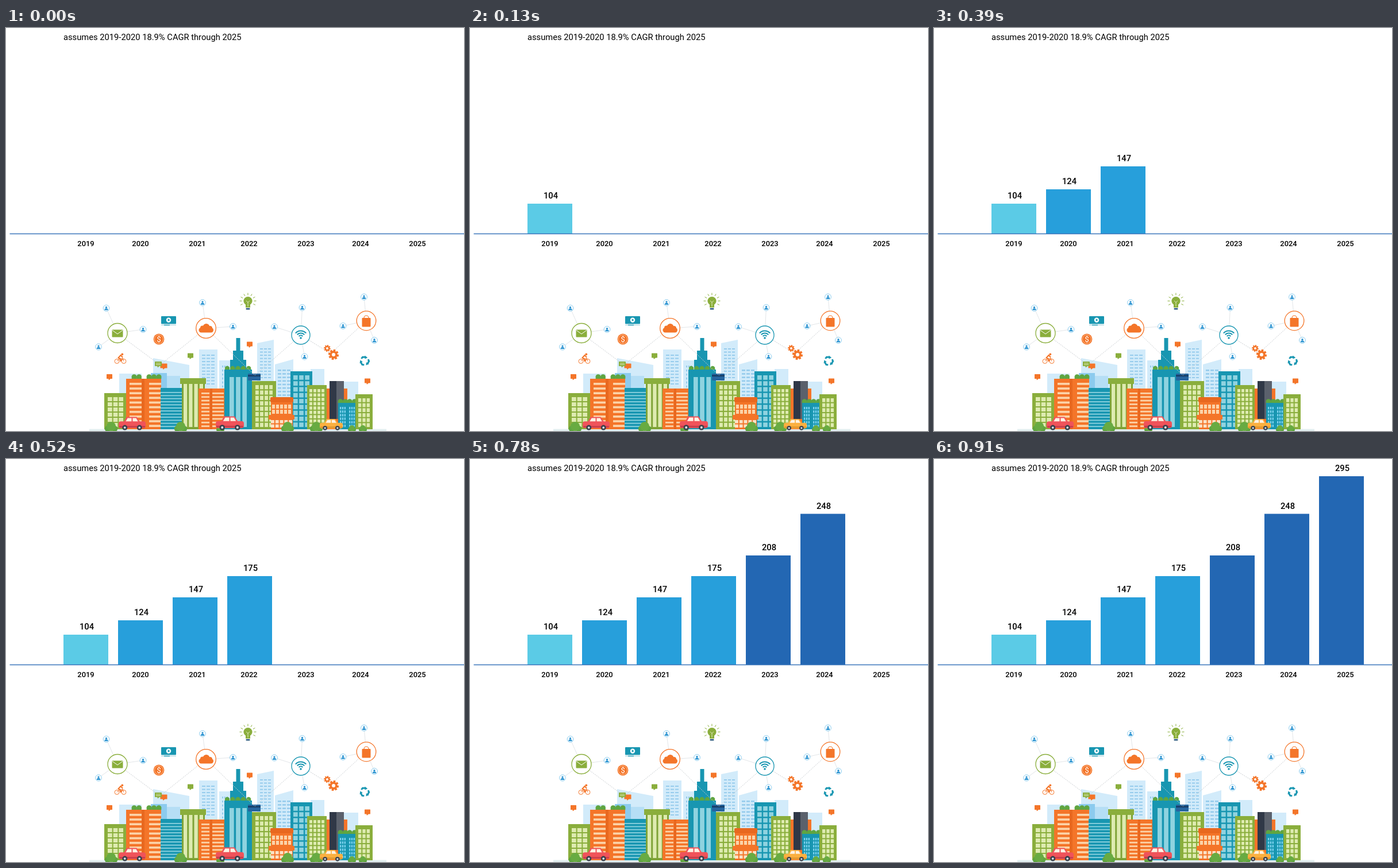
Animation of 797x702 px, one loop 1040 ms. Source, as an HTML page with a canvas:

```html
<!DOCTYPE html>
<html lang="en">
<head>
<meta charset="utf-8">
<title>Growth chart</title>
<style>
html, body { margin: 0; width: 100%; height: 100%; overflow: hidden; background: #fff; }
canvas { display: block; }
</style>
</head>
<body>
<canvas id="stage" width="797" height="702"></canvas>
<script>
const g = document.getElementById('stage').getContext('2d');
const GREEN = '#8aae3c', LEAF = '#5fa541', LIME = '#deebb0', ORANGE = '#f47529', RUST = '#e8681f', PEACH = '#fcd3a8';
const TEAL = '#1896b1', AQUA = '#8fd3e0', SKY = '#d2ebfa', PANE = '#95cbec', BLUE = '#2b93d1';
const GROUND = 699;

// Drawing helpers
function rect(color, x, y, w, h, r = 0) {
  g.fillStyle = color;
  g.beginPath();
  g.roundRect(x, y, w, h, r);
  g.fill();
}
function path(...p) {
  g.beginPath();
  for (let i = 0; i < p.length; i += 2) g.lineTo(p[i], p[i + 1]);
}
function poly(color, ...p) {
  path(...p);
  g.fillStyle = color;
  g.fill();
}
function line(color, w, ...p) {
  path(...p);
  g.strokeStyle = color;
  g.lineWidth = w;
  g.stroke();
}
function disc(color, x, y, r, from = 0, to = 7) {
  g.fillStyle = color;
  g.beginPath();
  g.arc(x, y, r, from, to);
  g.fill();
}
function ring(color, x, y, r, w = 1, from = 0, to = 7) {
  g.strokeStyle = color;
  g.lineWidth = w;
  g.beginPath();
  g.arc(x, y, r, from, to);
  g.stroke();
}
function grid(color, x, y, w, h, cols, rows, gapX, gapY = gapX) {
  const dx = (w + gapX) / cols, dy = (h + gapY) / rows;
  for (let i = 0; i < cols * rows; i++)
    rect(color, x + i % cols * dx, y + Math.floor(i / cols) * dy, dx - gapX, dy - gapY);
}
function text(s, x, y, font, align = 'center', color = '#000') {
  g.font = font + 'px Roboto, sans-serif';
  g.textAlign = align;
  g.fillStyle = color;
  g.fillText(s, x, y);
}
function spokes(count, from, span, drawOne) {
  for (let i = 0; i < count; i++) {
    const a = from + i * span / count;
    drawOne(Math.cos(a), Math.sin(a), a);
  }
}

// City parts
function tower(wall, x, top, w, glass, cols, rows, gapX, gapY = gapX, inset = 5) {
  rect(wall, x, top, w, GROUND - top);
  grid(glass, x + inset, top + 7, w - 2 * inset, GROUND - 11 - top, cols, rows, gapX, gapY);
}
function farTower(x, top, w, rise, panes) {
  poly(SKY, x, top, x + w, top - rise, x + w, 650, x, 650);
  if (panes) grid(PANE, x + 5, top + 9, w - 10, 52, 3, panes, 2, 3.6);
}
function hedge(x, count, r, step) {
  for (let i = 0; i < count; i++) disc(LEAF, x + i * step, 594 + r, r);
}
function rooftop(x, y, count, r = 4.5, step = 8.5) {
  for (let i = 0; i < count; i++) {
    rect(LEAF, x + i * step - r, y - r * .4, 2 * r, r * .8, 2);
    disc(LEAF, x + i * step, y - r * .5, r);
  }
}
function bush(x, r = 8) {
  const y = GROUND + 3 - r;
  disc(LEAF, x - r * .75, y + r * .5, r * .65);
  disc(LEAF, x + r * .75, y + r * .5, r * .65);
  disc('#68ab42', x, y, r);
}
function car(x, w, color, dark) {
  g.save();
  g.translate(x, 701 - w / 2);
  g.scale(w / 48, w / 48);
  poly(color, 9, 9, 14, 0, 32, 0, 38, 9);
  poly('#fdf3e4', 12, 9, 16, 2, 23, 2, 23, 9);
  poly('#fdf3e4', 25, 9, 25, 2, 31, 2, 35, 9);
  rect(color, 0, 8, 48, 12, 4);
  rect(dark, 1, 16, 46, 3, 1);
  for (const cx of [11, 37]) {
    disc('#39404b', cx, 19, 4.6);
    disc('#d9dde1', cx, 19, 2);
  }
  g.restore();
}
function bubble(color, x, y, w = 10) {
  rect(color, x - w / 2, y - 4, w, 8, .6);
  poly(color, x - 2, y + 3, x + 3, y + 3, x - 1, y + 6.5);
}
function gear(x, y, r) {
  spokes(8, .2, 2 * Math.PI, (c, s) => line(ORANGE, r * .42, x, y, x + r * c, y + r * s));
  disc(ORANGE, x, y, r * .74);
  disc('#fff', x, y, r * .34);
}
function user(x, y) {
  disc('#fff', x, y, 5.4);
  ring('#8accee', x, y, 5.4);
  disc(BLUE, x, y - 1.4, 1.7);
  disc(BLUE, x, y + 3.4, 3.2, Math.PI, 0);
}
function hub(color, x, y, r, ...users) {
  for (const [ux, uy] of users) line('#dfe3e6', .9, x, y, ux, uy);
  disc('#fff', x, y, r);
  ring(color, x, y, r, 1.3);
  for (const u of users) user(...u);
}

function skyline() {
  farTower(197, 602, 39, 0);
  farTower(256, 575, 63, -12);
  rect('#8ccbee', 252, 601, 28, 30);
  rect('#b5def5', 280, 606, 23, 25);
  farTower(336, 560, 32, 0, 10);
  farTower(371, 579, 20, 0, 8);
  farTower(437, 549, 29, 6, 10);
  farTower(468, 586, 32, 9, 9);
  farTower(530, 594, 24, 0);
  farTower(588, 616, 25, 0);
}

function buildings() {
  rect('#e3eff1', 145, 698.5, 517, 3.5);

  tower(GREEN, 171, 636, 39, LIME, 3, 6, 2, 2, 6);

  rooftop(223, 610, 2);
  rooftop(249, 610, 3);
  tower(ORANGE, 209, 611, 33, PEACH, 1, 10, 0, 4.4, 6);
  tower(ORANGE, 242, 611, 28, PEACH, 1, 10, 0, 4.4, 0);
  rect(RUST, 236, 611, 5, 88);
  rect(ORANGE, 241, 611, 8, 88);

  tower(TEAL, 269, 627, 44, AQUA, 1, 12, 0, 3.6, 0);

  tower('#7fa337', 306, 612, 40, LIME, 4, 1, 3, 3, 3);
  rect(GREEN, 303, 610, 45, 10);

  tower(ORANGE, 335, 628, 24, PEACH, 1, 10, 0, 3.6);
  tower(ORANGE, 357, 628, 24, PEACH, 1, 10, 0, 3.6, 2);
  rect(RUST, 355, 628, 4, 71);

  // Central tower narrows in steps
  rect(TEAL, 400.5, 540, 7, 25);
  rect(TEAL, 395, 562, 18, 20);
  rect(TEAL, 390, 578, 28, 20);
  rooftop(385, 595, 5, 4.2, 9.3);
  tower(TEAL, 380, 595, 48, AQUA, 3, 1, 3.5, 0, 9);
  rect(TEAL, 380, 600, 48, 8);

  tower(GREEN, 428, 615, 42, LIME, 4, 8, 2.2, 2.2, 6);
  rect('#26659f', 421, 602, 22, 12, 1);
  rect('#153b63', 421, 604.5, 22, 2.5);

  tower(TEAL, 495, 598, 38, AQUA, 3, 9, 2.5);

  rect(ORANGE, 461, 645, 38, 54);
  rect(RUST, 460, 643, 40, 9, 2);
  grid(PEACH, 463, 656, 33, 16, 5, 2, 2);
  rect(ORANGE, 457, 674, 45, 8, 1);
  grid('#fbe2c6', 461, 683, 37, 13, 5, 2, 2);

  rect(ORANGE, 557, 628, 37, 71);
  rect('#303847', 563, 615, 12, 66);
  rect('#5b616c', 575, 615, 13, 66);
  tower(GREEN, 524, 622, 34, LIME, 4, 9, 2, 2, 4);

  for (const x of [578, 594]) {
    rooftop(x + 4, 653, 2);
    tower(TEAL, x, 653, 16, '#7bd1ed', 3, 6, 1.5, 2, 3);
  }
  tower(GREEN, 608, 638, 30, LIME, 3, 6, 2);

  for (const x of [183, 304, 490, 540]) bush(x);
  for (const x of [373, 602, 621]) bush(x, 5);
  car(196, 47, '#f0535a', '#c93f4b');
  car(365, 49, '#f0535a', '#c93f4b');
  car(546, 40, '#fbb040', '#e0952c');
}

function network() {
  g.setLineDash([2, 1.6]);
  line('#c9cdd0', 1, 194, 532, 268, 587, 348, 523, 433, 605, 513, 535, 565, 567, 627, 510);
  g.setLineDash([]);

  hub(GREEN, 194, 531.5, 17, [174.5, 488], [238.5, 525], [161, 555.5]);
  rect(GREEN, 184.5, 525.5, 19, 13, 1);
  line('#fff', 1, 185, 526.5, 194, 533, 203, 526.5);

  hub(ORANGE, 348, 523, 17.3, [342, 478.5], [395, 520]);
  rect(ORANGE, 335.5, 522, 25.5, 8.5, 4.2);
  disc(ORANGE, 342, 522.5, 4);
  disc(ORANGE, 348.5, 521, 6);
  disc(ORANGE, 355, 523, 4);

  hub(TEAL, 513, 535, 16, [467, 520.5], [515.5, 487], [519.5, 572.5]);
  for (const r of [4.5, 8.5, 12.5]) ring(TEAL, 513, 540, r, 2, -2.4, -.74);
  disc(TEAL, 513, 540, 1.8);

  hub(ORANGE, 627, 510, 16.8, [586.5, 519], [623, 468.5], [641, 544]);
  ring(ORANGE, 627, 505, 4, 1.2, Math.PI, 0);
  rect(ORANGE, 619.5, 505, 15, 15.5, 1);
}

function icons() {
  // Light bulb
  spokes(9, Math.PI * .85, Math.PI * 1.46, (c, s) =>
    line(GREEN, 1, 421 + 10.5 * c, 476 + 10.5 * s, 421 + 14.5 * c, 476 + 14.5 * s));
  disc(GREEN, 421, 475.5, 7.6);
  rect(GREEN, 417, 480, 8, 7);
  line('#e8f0c8', .9, 418, 475, 421, 478, 424, 475);
  line('#e8f0c8', .9, 421, 478, 421, 485);
  rect('#28567f', 417.5, 488, 7, 2.5, 1);

  // Video player
  rect(TEAL, 270, 502, 26, 13.5, 1);
  disc('#fff', 283, 508.7, 4.2);
  poly(TEAL, 281.7, 506.3, 281.7, 511.1, 285.6, 508.7);
  line('#9bcbd6', .9, 270, 517.5, 296, 517.5);
  line(TEAL, 1.4, 275, 517.5, 285, 517.5);

  // Coin
  disc(ORANGE, 266, 542, 9.4);
  ring('#fbc9a4', 266, 542, 7.6, .8);
  text('$', 266, 547, 13.5, 'center', '#fff');

  // Cyclist
  for (const x of [193, 205]) ring(ORANGE, x, 580.5, 3.9);
  line(ORANGE, 1, 193, 580.5, 197, 576, 203, 576, 199.5, 581, 197, 576);
  line(ORANGE, 1, 205, 580.5, 202.5, 574);
  line(ORANGE, 2, 199.5, 581, 200, 577, 195.5, 574.5, 199.5, 570, 203, 573.5);
  disc(ORANGE, 202.3, 568.3, 1.9);

  bubble(GREEN, 321, 570.5);
  bubble(ORANGE, 424, 550.5);
  bubble(ORANGE, 180, 607);
  bubble(ORANGE, 629, 614.5);
  bubble(ORANGE, 274.5, 588.5, 12);
  bubble(GREEN, 265, 585, 12);
  for (const y of [584, 586.5]) line('#e5efc4', .9, 261, y, 269, y);

  gear(570, 569, 9);
  gear(559, 558, 5.8);

  // Three chasing arrows
  spokes(3, 0, 2 * Math.PI, (c, s, angle) => {
    g.save();
    g.translate(624, 580);
    g.rotate(angle);
    line(TEAL, 3, -5.5, -4, -3.5, -6.8, 1, -6.8);
    poly(TEAL, .5, -9.5, 5.2, -5.8, .5, -3.6);
    g.restore();
  });
}

// Bars are 95 px apart; values grow by a constant yearly rate
const barTops = [306, 281, 241, 204, 168, 95.6, 30];
const yearCentres = [139, 234, 333, 423, 522, 617, 716];

function chart(count) {
  text('assumes 2019-2020 18.9% CAGR through 2025', 100, 21.3, 14.72, 'left');
  barTops.forEach((top, i) => {
    text(2019 + i, yearCentres[i], 380, '500 12.9');
    if (i >= count) return;
    const x = 100 + 95 * i;
    rect(i === 0 ? '#5bcbe6' : i < 4 ? '#279fdb' : '#2367b3', x, top, 78, 358 - top);
    text(Math.round(104 * 1.1897 ** i), x + 40.5, top - 9, '500 14.7');
  });
  line('#3b76ba', 1.3, 6.5, 358.5, 797, 358.5);
}

function draw(count) {
  g.clearRect(0, 0, 797, 702);
  skyline();
  buildings();
  network();
  icons();
  chart(count);
}

let shown = -1;
function tick() {
  const count = Math.floor(performance.now() % 1040 / 130);
  if (count !== shown) draw(shown = count);
  requestAnimationFrame(tick);
}
tick();
</script>
</body>
</html>
```
